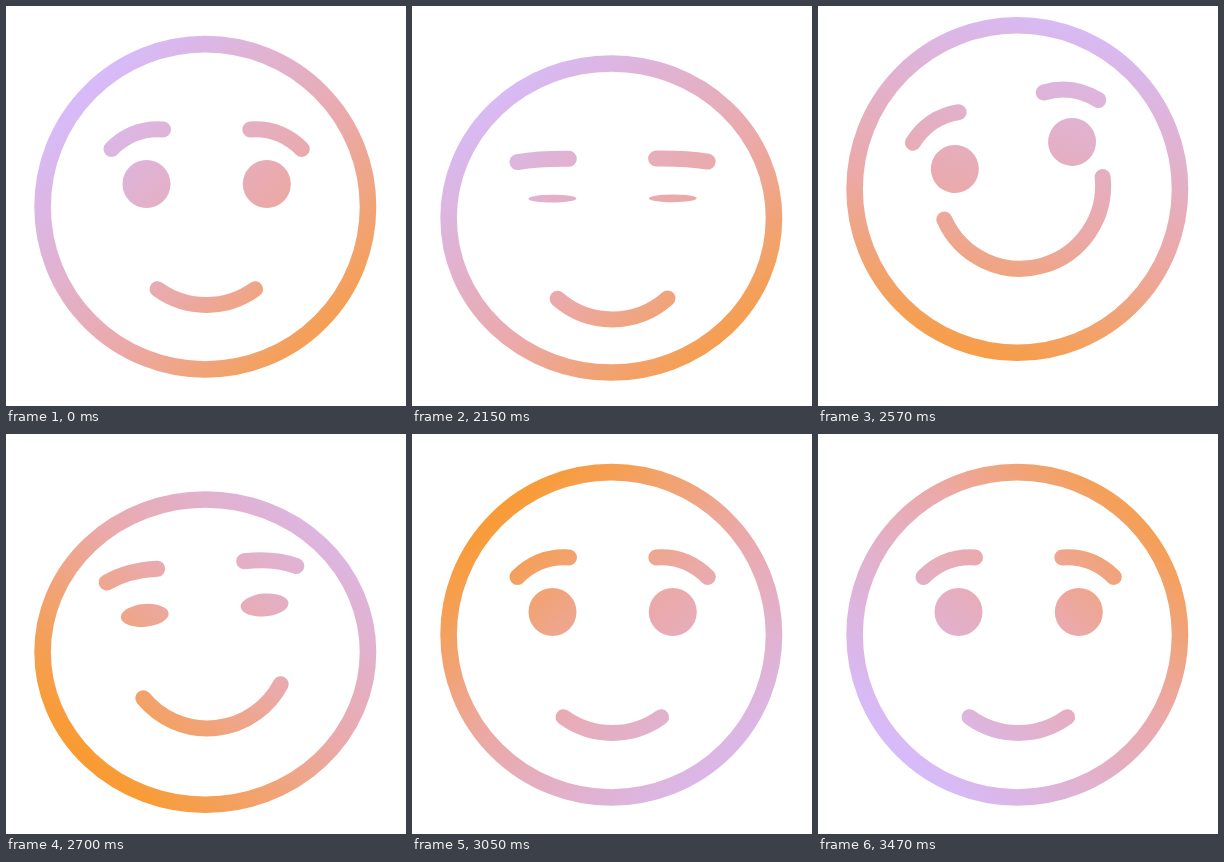
These frames come from a looping animation (400x400 px, 3.52 s). An HTML page:

```html
<!DOCTYPE html>
<html lang="en">
<head>
<meta charset="utf-8">
<title>Smiling face</title>
<style>
  html, body { margin: 0; width: 100%; height: 100%; overflow: hidden; background: #fff; }
  svg { display: block; width: 100vw; height: 100vh; }
</style>
</head>
<body>
<svg viewBox="0 0 400 400">
  <defs>
    <linearGradient id="tint" gradientUnits="userSpaceOnUse">
      <stop offset="0" stop-color="#d6bbfb"/>
      <stop offset=".55" stop-color="#eba9a8"/>
      <stop offset="1" stop-color="#f99b32"/>
    </linearGradient>
    <mask id="shape" maskUnits="userSpaceOnUse" x="0" y="0" width="400" height="400">
      <g fill="none" stroke="#fff" stroke-width="16" stroke-linecap="round">
        <ellipse id="ring" cx="199.3" rx="162.7" stroke-width="16.6"/>
        <g id="face">
          <path id="brows"/>
          <path id="mouth"/>
          <g fill="#fff" stroke="none">
            <ellipse id="eyeL" cx="140.5" cy="178" rx="24"/>
            <ellipse id="eyeR" cx="260.8" cy="178" rx="24"/>
          </g>
        </g>
      </g>
    </mask>
  </defs>
  <rect width="400" height="400" fill="url(#tint)" mask="url(#shape)"/>
</svg>
<script>
const LOOP = 3520, START = 2020, LAG = 40;

const rest = { cy: 200.8, ry: 162.7, dy: 0, tilt: 0, squint: 0, smile: 36, lift: 0 };
const squash = { ...rest, cy: 220, ry: 152, dy: 15, squint: .85, smile: 41 };
const jump = { ...rest, cy: 183, ry: 163.7, dy: -29, tilt: 13, smile: 81, lift: -7 };
const beats = [
  [2000, rest], [2100, squash], [2270, jump], [2580, jump], [2720, squash], [2850, rest]
];

const el = id => document.getElementById(id);
const set = (id, attrs) => {
  for (const k in attrs) el(id).setAttribute(k, attrs[k]);
};
const rad = deg => deg * Math.PI / 180;
const mix = (a, b, p) => a + (b - a) * p;
const span = (t, from, to) => Math.min(1, Math.max(0, (t - from) / (to - from)));
const smooth = u => u * u * (3 - 2 * u);

function poseAt(t) {
  const pose = { ...rest };
  for (let i = 1; i < beats.length; i++) {
    const [from] = beats[i - 1], [to, goal] = beats[i];
    const p = smooth(span(t, from, to));
    for (const k in pose) pose[k] = mix(pose[k], goal[k], p);
  }
  return pose;
}

// Direction of the purple end: speeds up, then slows down
function turnAt(t) {
  const gain = span(t, START, 3050) ** 1.8;
  const settle = 1 - (1 - span(t, 3050, 3470)) ** 1.5;
  return -135 + 185 * gain + 85 * settle;
}

function drawBrows(squint) {
  const y = v => mix(v, 133, squint) + 8 * squint;
  const lo = y(143), hi = y(123.5), top = y(121.5);
  set('brows', {
    d: `M105.5 ${lo}Q127 ${top} 157 ${hi}M244.3 ${hi}Q274 ${top} 295.8 ${lo}`
  });
}

function drawMouth({ smile, lift, tilt }) {
  const r = 83, cx = 200.3, cy = 216 + lift;
  const point = deg => `${cx + r * Math.sin(rad(deg))} ${cy + r * Math.cos(rad(deg))}`;
  const skew = tilt * .16;
  set('mouth', { d: `M${point(skew - smile)}A${r} ${r} 0 0 0 ${point(skew + smile)}` });
}

function drawTint(deg) {
  const half = 196, x = half * Math.cos(rad(deg)), y = half * Math.sin(rad(deg));
  set('tint', { x1: 235 + x, y1: 200 + y, x2: 235 - x, y2: 200 - y });
}

function render(time) {
  const t = time < START ? 0 : time;
  const { cy, ry } = poseAt(t);
  const face = poseAt(t - LAG);
  set('ring', { cy, ry });
  set('face', { transform: `translate(0 ${face.dy}) rotate(${-face.tilt} 200 201)` });
  for (const id of ['eyeL', 'eyeR']) set(id, { ry: 24 * (1 - face.squint) });
  drawBrows(face.squint);
  drawMouth(face);
  drawTint(turnAt(t));
}

const begin = performance.now();
function tick() {
  render((performance.now() - begin) % LOOP);
  requestAnimationFrame(tick);
}
tick();
</script>
</body>
</html>
```
